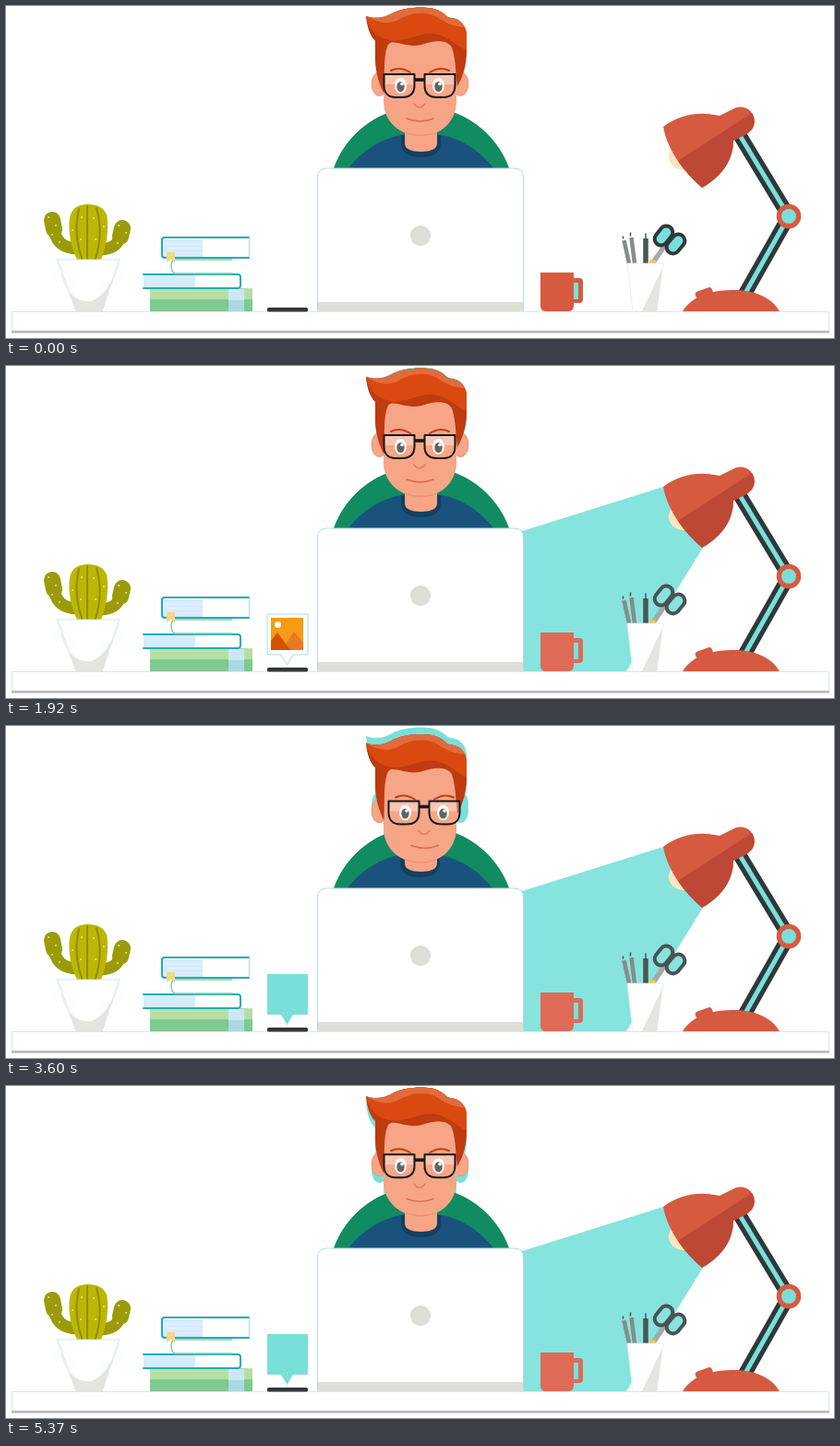
These frames come from a looping animation (897 px wide and 360 px high, 5400 ms). An HTML page:

```html
<!DOCTYPE html>
<html lang="en">
<head>
<meta charset="utf-8">
<title>Desk</title>
<style>
html, body { margin: 0; width: 100%; height: 100%; overflow: hidden; background: #fff; }
svg { display: block; width: 897px; height: 360px; }
.line { fill: none; stroke-linecap: round; stroke-linejoin: round; }
.red { fill: #d65a40; }
.dim { fill: #bd4836; }
.teal { fill: #7bdfd9; }
.ash { fill: #e4e5de; }
</style>
</head>
<body>
<svg viewBox="0 0 897 360">
  <defs>
    <path id="hair" d="M390 11C402 15 412 12 420 7C432 1 458 -1 469 5C476 8 477 13 483 13C492 14 498 21 499 30V50C499 64 495 77 489 87L484 50H415L410 96C404 85 400 70 400 58V38C394 32 391 22 390 11Z"/>
    <path id="face" d="M409 103C411 76 408 54 414 42C420 35 432 46 450 42C464 37 478 36 483 45C488 60 488 80 488 103C488 126 470 141 449 141S409 126 409 103Z"/>
    <ellipse id="earL" cx="404.500" cy="84.500" rx="8.500" ry="13"/>
    <ellipse id="earR" cx="492.500" cy="84.500" rx="8.500" ry="13"/>
    <g id="shape"><use href="#hair"/><use href="#face"/><use href="#earL"/><use href="#earR"/></g>
  </defs>

  <polygon id="beam" fill="#87e3dd" points="712,131 755,197 672,331 556,331 556,180"/>

  <!-- cactus -->
  <g class="line" stroke="#999c08">
    <path stroke-width="18" d="M50 232L52 242"/>
    <path stroke-width="13" d="M52 242C54 256 62 262 76 263"/>
    <path stroke-width="18" d="M126 241L124 250"/>
    <path stroke-width="13" d="M124 248C122 258 116 263 104 264"/>
  </g>
  <path fill="#bcb603" d="M78 277C70 262 66 240 70 226Q74 215 89 215T109 226C112 240 109 262 102 277Z"/>
  <g class="line" stroke="#918c08" stroke-width="2">
    <path d="M79 220C74 238 77 261 83 276M88 217V276M98 219C104 238 102 261 96 276"/>
  </g>
  <path class="line" stroke="#e7e5a0" stroke-width="1.800" d="M46 229h.1M54 238h.1M50 248h.1M58 256h.1M82 229h.1M72 243h.1M81 253h.1M95 230h.1M106 239h.1M97 253h.1M122 238h.1M130 246h.1M121 257h.1"/>
  <path fill="#fff" stroke="#c9e8e8" d="M55 275H123L120 284L104 331H76L59 284Z"/>
  <path class="ash" d="M59 288C64 312 78 322 92 320C104 316 112 305 117 290L104 331H76Z"/>

  <!-- books -->
  <rect x="156" y="306" width="111" height="13" fill="#b4dfa4"/>
  <rect x="156" y="318" width="111" height="13" fill="#7fca8e"/>
  <path fill="#c9e8f1" d="M241 307H258V331H241Z"/>
  <path fill="#a9d9e3" d="M241 319H258V331H241Z"/>
  <path fill="#fff" d="M149 291H252V306H149Z"/>
  <path fill="#d6ebfb" d="M149 292H205V305H149Z"/>
  <path class="line" stroke="#22acb6" stroke-width="2" d="M149 291H251Q254 291 254 294V303Q254 306 251 306H149"/>
  <path class="line" stroke="#8ccda0" stroke-width="1.600" d="M245 275H183Q179 276 179 282T183 290H245"/>
  <path fill="#d6ebfb" d="M171 253H213V272H171Z"/>
  <path class="line" stroke="#22acb6" stroke-width="2.200" d="M263 251H172Q169 251 169 254V270Q169 273 172 273H263"/>
  <path class="line" stroke="#a8dce2" d="M263.500 252V272"/>
  <path class="line" stroke="#fff" opacity=".45" d="M174 258H212M174 263H212M174 268H212"/>
  <path fill="#f5d886" d="M174 267H183V278L178.500 275L174 278Z"/>

  <!-- lamp -->
  <circle cx="733" cy="163" r="15" fill="#fbe6bd"/>
  <g class="line" stroke-linecap="butt">
    <path stroke="#2f383a" stroke-width="15" d="M793 137L848 228L800 313"/>
    <path stroke="#7bdfd9" stroke-width="5" d="M793 137L848 228L800 313"/>
  </g>
  <circle class="red" cx="848" cy="228" r="13.300"/>
  <circle class="teal" cx="848" cy="228" r="8"/>
  <path class="red" d="M712 131C730 117 752 114 773 119L789 111C800 106 811 114 811 125C811 133 806 137 800 140L788 146C788 168 775 185 754 197C735 180 717 158 712 131Z"/>
  <path class="dim" d="M728 168L808 116C813 125 810 135 800 140L788 146C788 168 775 185 754 197C744 188 735 179 728 168Z"/>
  <path class="red" d="M733 331C742 316 762 308 787 308S829 316 838 331Z"/>
  <rect class="red" x="747" y="307" width="19" height="11" rx="3" transform="rotate(-20 757 312)"/>

  <!-- mug -->
  <g id="mug">
    <path d="M579 289H615V325Q615 331 609 331H585Q579 331 579 325Z"/>
    <path fill-rule="evenodd" d="M614 295H621Q625 295 625 299V318Q625 322 621 322H614ZM615 300H620V318H615Z"/>
  </g>
  <path class="teal" d="M615 300H620V318H615Z"/>

  <!-- pens and scissors -->
  <g class="line" stroke-width="4.500">
    <path stroke="#858c8a" stroke-linecap="butt" d="M669.500 254L675 279M677.500 251L681 279"/>
    <path stroke="#4a5557" stroke-width="5.500" stroke-linecap="butt" d="M693 252V279"/>
    <path stroke="#4a5557" stroke-width="1.500" d="M668.500 250V252M676.500 246V249M693 247V252"/>
    <path stroke="#a5a9a7" stroke-width="5.500" d="M713 261L701 278"/>
    <path stroke="#f3c84b" d="M699 277.500H702"/>
    <g id="scissors" stroke-width="4">
      <rect x="705.500" y="237.500" width="14" height="23" rx="7" transform="rotate(38 712.500 249)"/>
      <rect x="718.500" y="246.500" width="14" height="23" rx="7" transform="rotate(40 725.500 258)"/>
    </g>
  </g>
  <path fill="#fff" stroke="#d9eeee" stroke-width=".7" d="M673 279H712L705 331H679Z"/>
  <path class="ash" d="M711 284L689 331H705Z"/>

  <!-- traces left by the head -->
  <g id="trace" class="teal">
    <use href="#shape"/>
    <use id="low" href="#shape"/>
  </g>

  <!-- person -->
  <path fill="#118c61" d="M354.500 177A101 101 0 0 1 545.500 177Z"/>
  <g id="shirt">
    <path fill="#1a527d" d="M370 177C386 156 407 143 432 139H467C492 143 513 156 529 177Z"/>
    <path fill="#12405f" d="M428 140V149C428 160 438 164 449.500 164S471 160 471 149V140Z"/>
  </g>
  <path fill="#f7a587" d="M432 125H467V149C467 155 460 158 449.500 158S432 155 432 149Z"/>
  <g id="head">
    <g fill="#f7a587" stroke="#ed8d72" stroke-width=".8">
      <use id="leftEar" href="#earL"/>
      <use id="rightEar" href="#earR"/>
    </g>
    <use href="#hair" fill="#bf3b10"/>
    <use href="#face" fill="#f7a587"/>
    <path class="line" stroke="#ed8d72" stroke-width="1.300" d="M433 137.500Q449 143.500 466 137.500"/>
    <path fill="#da490f" d="M390 11C402 15 412 12 420 7C432 1 458 -1 469 5C476 8 477 13 483 13C492 14 498 21 499 30V48C487 43 481 34 468 31C449 26 435 40 416 37C400 34 393 23 390 11Z"/>
    <path fill="#e26b3d" d="M390 11C402 15 412 12 420 7C432 1 458 -1 469 5C476 8 477 13 483 13C490 14 495 18 497 23C483 22 476 18 467 12C452 4 435 9 425 15C414 21 402 18 390 11Z"/>
    <g id="look">
      <g class="line" stroke="#c3410f" stroke-width="2">
        <path d="M417 70Q427 65 438 72M459 72Q470 65 480 70"/>
      </g>
      <path fill="#fff" opacity=".35" d="M409 74H443V85H409ZM453 74H487V85H453Z"/>
      <g fill="#fff">
        <ellipse cx="427.500" cy="86.500" rx="6.500" ry="8.500"/>
        <ellipse cx="468.500" cy="86.500" rx="6.500" ry="8.500"/>
      </g>
      <g fill="#646462">
        <ellipse cx="427.500" cy="87.500" rx="4.200" ry="5.500"/>
        <ellipse cx="468.500" cy="87.500" rx="4.200" ry="5.500"/>
      </g>
      <g fill="#fff"><circle cx="429" cy="84.500" r="1.800"/><circle cx="470" cy="84.500" r="1.800"/></g>
      <g class="line" stroke="#15181b" stroke-width="2">
        <path d="M409.500 74H442.500V86C442.500 95 437 99 429 99H422C414 99 409.500 94 409.500 86ZM453.500 74H486.500V86C486.500 94 482 99 474 99H467C459 99 453.500 95 453.500 86Z"/>
        <path stroke-width="3.600" stroke-linecap="butt" d="M442 80H454"/>
      </g>
      <path class="line" stroke="#e67f62" stroke-width="1.700" d="M442 106Q448 114 454 106"/>
      <path class="line" stroke="#dd6c50" stroke-width="1.700" d="M434 122Q449 128 463 122"/>
    </g>
  </g>

  <!-- laptop and desk -->
  <path fill="#fff" stroke="#b3dfe6" d="M337.500 331V186Q337.500 176 347.500 176H551Q560.500 176 560.500 186V331Z"/>
  <path fill="#dddfd6" d="M338 321H560V328Q560 331 557 331H341Q338 331 338 328Z"/>
  <circle cx="449" cy="249" r="11" fill="#dddfd6"/>
  <rect x="6.500" y="331.500" width="885" height="23" fill="#fff" stroke="#d5eaee"/>
  <rect x="6" y="352" width="886" height="2.600" fill="#b9b9c5"/>

  <!-- phone and its message -->
  <rect x="283" y="327" width="44" height="4.500" rx="1.500" fill="#343638"/>
  <g id="bubble">
    <path id="balloon" d="M283 269H327V313H311L304.500 324L298 313H283Z"/>
    <g id="photo">
      <rect x="287" y="273" width="35" height="35" fill="#f69b13"/>
      <circle cx="294.500" cy="280.500" r="3.500" fill="#fff"/>
      <path fill="#e67a20" d="M299 308L312 288L322 300V308Z"/>
      <path fill="#d35400" d="M287 308V298L294 289L308 308Z"/>
    </g>
  </g>
</svg>
<script>
const LOOP = 5400, SIDE = 5, DROP = 7.5;
const LIGHT_ON = 300, PHOTO_ON = 900, PHOTO_OFF = 2700;
const turnSteps = [[0, 0], [900, -SIDE], [1800, 0], [2700, 0], [3600, SIDE], [4500, 0], [LOOP, 0]];
const nodSteps = [[0, 0], [1800, 0], [2700, DROP], [4500, DROP], [LOOP, 0]];

const el = id => document.getElementById(id);
const set = (id, name, value) => el(id).setAttribute(name, value);
const move = (id, x, y) => set(id, "transform", `translate(${x.toFixed(2)} ${y.toFixed(2)})`);
const show = (id, on) => set(id, "visibility", on ? "visible" : "hidden");

function sample(steps, t) {
  const i = steps.findIndex(([end]) => end > t);
  const [t0, a] = steps[i - 1], [t1, b] = steps[i];
  return a + (b - a) * (t - t0) / (t1 - t0);
}

function draw(t) {
  const turn = sample(turnSteps, t), nod = sample(nodSteps, t);
  move("head", 0, nod);
  move("look", turn, 0);
  move("leftEar", Math.max(0, -turn) * 1.8, 0);
  move("rightEar", Math.min(0, -turn) * 1.8, 0);
  move("shirt", -turn * 0.25, 0);

  // the traces cover every height the head has reached so far
  show("trace", t > 30);
  move("low", 0, t < 2700 ? nod : DROP);

  const lit = t >= LIGHT_ON;
  show("beam", lit);
  set("mug", "fill", lit ? "#dd6b58" : "#d65a40");
  set("scissors", "stroke", lit ? "#4a5355" : "#2f383a");
  set("scissors", "fill", lit ? "#87e3dd" : "#7bdfd9");

  const photo = t < PHOTO_OFF;
  show("bubble", t >= PHOTO_ON);
  set("photo", "opacity", photo ? 1 : 0);
  set("balloon", "fill", photo ? "#fff" : "#7bdfd9");
  set("balloon", "stroke", photo ? "#a5dfe2" : "none");
}

const start = performance.now();
function tick() {
  draw((performance.now() - start) % LOOP);
  requestAnimationFrame(tick);
}
tick();
</script>
</body>
</html>
```
